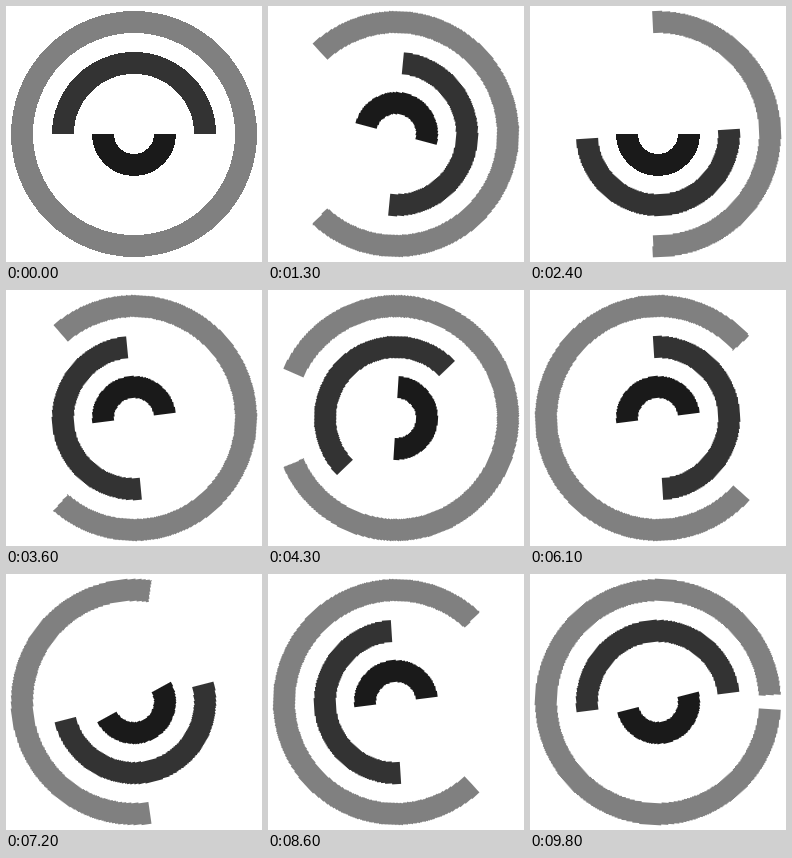
Write an HTML page that moves like this. It is 256 by 256 pixels and loops after 9900 ms.

```html
<!DOCTYPE html>
<html lang="en">
<head>
<meta charset="utf-8">
<title>Turning rings</title>
<style>
  html, body { margin: 0; height: 100%; overflow: hidden; background: #fff; }
  svg { display: block; width: 100vw; height: 100vh; }
  circle { fill: none; stroke-width: 22; shape-rendering: crispEdges; }
</style>
</head>
<body>
<svg viewBox="0 0 256 256">
  <g transform="translate(128 128)">
    <circle id="outer" r="112" stroke="#808080" pathLength="360"/>
    <circle id="middle" r="71" stroke="#333" pathLength="360"/>
    <circle id="inner" r="31" stroke="#1a1a1a" pathLength="360"/>
  </g>
</svg>
<script>
  const STEPS = 99;
  const STEP_MS = 100;

  // An arc of the given length in degrees, clockwise from the start angle.
  const arc = (start, length) => ({
    transform: `rotate(${start}deg)`,
    strokeDasharray: `${length} 360`
  });

  // The gap opens to a half circle and closes again, first left, then right.
  function gapRing(step) {
    const angle = 360 * step / STEPS;
    const phase = angle % 180;
    const half = Math.min(phase, 180 - phase);
    const centre = angle < 180 ? 180 : 0;
    return arc(centre + half, 360 - 2 * half);
  }

  // Each turn starts and ends on a whole step.
  function spin(step, turns) {
    const key = i => Math.floor(i * STEPS / turns);
    let i = 0;
    while (i < turns - 1 && step >= key(i + 1)) i++;
    return 360 * (i + (step - key(i)) / (key(i + 1) - key(i)));
  }

  const rings = {
    outer: gapRing,
    middle: step => arc(180 + spin(step, 2), 180),
    inner: step => arc(spin(step, 4), 180)
  };

  for (const [id, pose] of Object.entries(rings)) {
    const frames = Array.from({ length: STEPS + 1 }, (_, step) => ({
      ...pose(step),
      offset: step / STEPS,
      easing: "step-end"
    }));
    document.getElementById(id).animate(frames, {
      duration: STEPS * STEP_MS,
      iterations: Infinity
    });
  }
</script>
</body>
</html>
```
